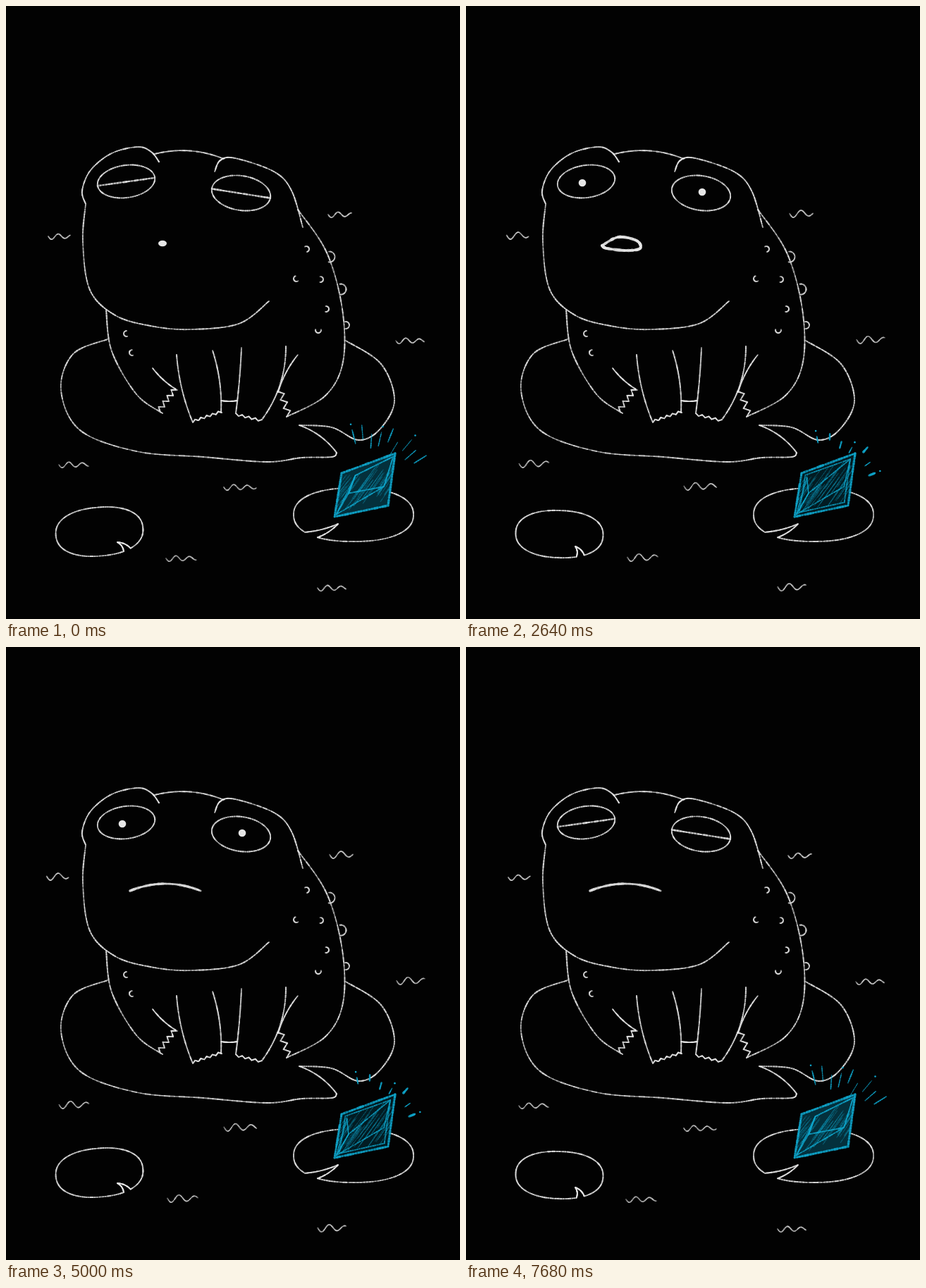
Animation, 644 px wide and 870 px high, one loop 7.84 s. Source, as an HTML page with a canvas:

```html
<!DOCTYPE html>
<html lang="en">
<head>
<meta charset="utf-8">
<title>Frog and gem</title>
<style>
html, body { margin: 0; width: 100%; height: 100%; overflow: hidden; background: #020202; }
canvas { display: block; width: 644px; height: 870px; }
</style>
</head>
<body>
<canvas id="stage" width="644" height="870"></canvas>
<script>
const W = 644, H = 870, LOOP = 7840, TICK = 40, RAD = Math.PI / 180;
const WHITE = '#e6e6e6', BLUE = '#0fa6cc';
const stage = document.getElementById('stage').getContext('2d');
let ctx, seed = 7;

function rnd() {
  seed = (seed * 16807) % 2147483647;
  return seed / 2147483647;
}

const mix = (a, b, u) => a + (b - a) * u;
const polar = (x, y, r, deg) => [x + r * Math.cos(deg * RAD), y + r * Math.sin(deg * RAD)];

// Each pose is drawn once and kept.
function layer(draw) {
  const c = document.createElement('canvas');
  c.width = W;
  c.height = H;
  ctx = c.getContext('2d');
  ctx.lineCap = 'round';
  draw();
  return c;
}

// Grainy chalk stroke along point(u), u from 0 to 1.
function chalk(point, { width = 1.9, color = WHITE, alpha = 0.9, steps = 40 } = {}) {
  ctx.strokeStyle = color;
  let last = point(0);
  for (let i = 1; i <= steps; i++) {
    const next = point(i / steps);
    ctx.globalAlpha = alpha * mix(0.6, 1, rnd());
    ctx.lineWidth = width * mix(0.8, 1.2, rnd());
    ctx.beginPath();
    ctx.moveTo(...last);
    ctx.lineTo(...next);
    ctx.stroke();
    last = next;
  }
  ctx.globalAlpha = 1;
}

// Smooth curve through a few key points.
function curve(points, style) {
  const n = points.length - 1;
  const key = i => points[Math.max(0, Math.min(n, i))];
  chalk(u => {
    const i = Math.min(n - 1, Math.floor(u * n)), s = u * n - i;
    return [0, 1].map(d => {
      const [a, b, c, e] = [-1, 0, 1, 2].map(k => key(i + k)[d]);
      return b + s / 2 * (c - a + s * (2 * a - 5 * b + 4 * c - e + s * (3 * (b - c) + e - a)));
    });
  }, { steps: n * 14, ...style });
}

function line(a, b, style) {
  chalk(u => [mix(a[0], b[0], u), mix(a[1], b[1], u)], { steps: 20, ...style });
}

// Line that bulges sideways by bend.
function bow(a, b, bend, style) {
  const dx = b[0] - a[0], dy = b[1] - a[1], len = Math.hypot(dx, dy);
  chalk(u => {
    const k = 4 * u * (1 - u) * bend / len;
    return [a[0] + dx * u - dy * k, a[1] + dy * u + dx * k];
  }, style);
}

function toes(a, b, count, depth) {
  const dx = b[0] - a[0], dy = b[1] - a[1], len = Math.hypot(dx, dy);
  let last = a;
  for (let i = 1; i <= count * 2; i++) {
    const u = i / (count * 2), k = i % 2 ? depth / len : 0;
    const next = [a[0] + dx * u + dy * k, a[1] + dy * u - dx * k];
    line(last, next, { steps: 5 });
    last = next;
  }
}

function wart(x, y, r, facing) {
  chalk(u => polar(x, y, r, facing + mix(-100, 100, u)), { steps: 12, alpha: 0.8 });
}

function dot(x, y, rx, ry = rx, color = WHITE) {
  ctx.fillStyle = color;
  ctx.beginPath();
  ctx.ellipse(x, y, rx, ry, 0, 0, 7);
  ctx.fill();
}

// Slightly boxy oval, open at one angle where two lines run in to the tip.
function leaf(x, y, rx, ry, tilt, notch, gap, tip) {
  const box = v => Math.sign(v) * Math.abs(v) ** 0.88;
  const rim = u => {
    const a = (notch + mix(gap, 360 - gap, u)) * RAD, c = Math.cos(tilt * RAD), s = Math.sin(tilt * RAD);
    const px = rx * box(Math.cos(a)), py = ry * box(Math.sin(a));
    return [x + px * c - py * s, y + px * s + py * c];
  };
  chalk(rim, { steps: 130 });
  bow(rim(0), tip, 2);
  bow(rim(1), tip, 2);
}

function head() {
  curve([[113, 281], [108, 262], [120, 233], [150, 209], [187, 200], [206, 207], [217, 221]]);
  bow([211, 210], [309, 217], -8);
  curve([[296, 235], [304, 219], [325, 216], [380, 235], [405, 262], [421, 314]]);
  curve([[113, 281], [109, 335], [119, 403], [155, 439], [205, 454], [260, 459], [330, 451], [373, 419]]);
}

function body() {
  curve([[414, 289], [455, 350], [477, 430], [478, 505], [453, 553], [398, 583]]);
  curve([[142, 431], [150, 490], [185, 551], [222, 578]]);
  bow([208, 514], [241, 544], 2);
  bow([242, 495], [265, 591], 4);
  bow([293, 489], [305, 577], -4);
  bow([305, 560], [328, 560], 1);
  bow([334, 485], [326, 578], -1);
  bow([397, 483], [363, 587], -9);
  bow([414, 495], [386, 548], 3);
  toes([243, 545], [219, 577], 4, -7);
  toes([265, 591], [306, 577], 5, 3);
  toes([326, 578], [363, 587], 4, -3);
  toes([385, 547], [398, 583], 3, 8);
  for (const y of [356, 402, 453]) wart(y < 400 ? 459 : mix(475, 482, (y - 402) / 51), y, y > 450 ? 5 : 7.5, 0);
  for (const [x, y, facing] of [[426, 345, -20], [412, 387, 150], [446, 388, 0], [454, 430, 0],
    [443, 460, 90], [171, 465, 170], [179, 492, 170]]) wart(x, y, 4, facing);
}

function bigLeaf() {
  curve([[144, 473], [95, 494], [78, 545], [105, 602], [185, 632], [280, 640], [370, 647], [420, 641], [462, 640], [469, 634]]);
  bow([469, 634], [416, 595], 5);
  curve([[416, 595], [462, 598], [500, 616], [530, 601], [551, 560], [532, 508], [482, 475]]);
}

const frog = layer(() => { head(); body(); bigLeaf(); });

const leaves = [0, 1].map(p => layer(() => {
  leaf(132.5, 746 + 3.5 * p, 62, 34.5 - p, p ? 2 : -5, p ? 63 : 56, 6, [158 - 3 * p, 761 + 6 * p]);
  leaf(493, 722, 85, 38, 0, 133, 9, [471, 735]);
}));

// Gem: u runs along the top edge, v down the left edge.
const facet = (u, v) => [476 + 76 * u - 10 * v, 663 - 28 * u + 62 * v + 12 * u * v];

function loop(points, style) {
  points.forEach((p, i) => line(p, points[(i + 1) % points.length], { color: BLUE, ...style }));
}

function square(inset) {
  const o = 1 - inset;
  return [facet(inset, inset), facet(o, inset), facet(o, o), facet(inset, o)];
}

function rays(count, from, to, length, width) {
  for (let i = 0; i < count; i++) {
    const a = mix(from, to, i / (count - 1)), r = mix(62, 78, rnd()), w = width * mix(0.6, 1.4, rnd());
    line(polar(513, 690, r, a), polar(513, 690, r + length, a), { color: BLUE, width: w, steps: 6 });
    if (i % 3 === 0) dot(...polar(513, 690, r + length + 8, a), 1.3, 1.3, BLUE);
  }
}

const gems = [0, 1].map(p => layer(() => {
  const rim = square(0);
  ctx.fillStyle = p ? '#021c23' : '#04303c';
  ctx.beginPath();
  rim.forEach(c => ctx.lineTo(...c));
  ctx.fill();
  ctx.save();
  ctx.clip();
  for (let i = 0; i < 44; i++) {
    const u = mix(0.08, 1.3, rnd()), v = mix(0.08, 0.5, rnd());
    line(facet(u, v), facet(u - 0.3, v + 0.45), { color: BLUE, width: 1.1, alpha: 0.36, steps: 12 });
  }
  ctx.restore();
  loop(rim, { width: 3 });
  const low = facet(0.03, 0.95), left = facet(0.2, 0.53), right = facet(0.87, 0.6);
  if (p) {
    loop(square(0.08), { width: 1.6, alpha: 0.8 });
    loop([low, facet(0.12, 0.15), left], { width: 1.6, alpha: 0.8 });
    loop([left, facet(0.92, 0.08), right, low], { width: 1.6, alpha: 0.8 });
    rays(7, -101, -22, 9, 2.2);
  } else {
    loop([left, facet(0.28, 0.17), facet(0.97, 0.05), right], { width: 2 });
    loop([low, facet(0.28, 0.17), left], { width: 1.7, alpha: 0.85 });
    line(low, right, { color: BLUE, width: 1.7 });
    rays(9, -104, -32, 20, 1.5);
  }
}));

// x, y, length and sideways drift of each ripple.
const ripples = [[60, 327, 31, -9], [457, 296, 33, 8], [553, 475, 40, 4], [75, 651, 42, 1],
  [309, 683, 46, 1], [227, 784, 43, 8], [442, 826, 40, 1]];

const waters = [0, 1, 2].map(p => layer(() => {
  for (const [x, y, length, drift] of ripples) {
    const amp = p ? 6 : 4.5, cycles = length / (p ? 22 : 19), shift = drift * p * p / 4;
    chalk(u => [x + shift + length * u, y - 1.5 * p + amp * (1 - 0.5 * u) * Math.sin(u * cycles * 2 * Math.PI)],
      { width: 1.8, alpha: 0.68, steps: 30 });
  }
}));

const eyeballs = [
  { x: 170.5, y: 249, rx: 41, ry: 23, tilt: -8, pupil: [165, 251] },
  { x: 333.5, y: 265.5, rx: 42, ry: 24.5, tilt: 9, pupil: [335, 264] }
];

// Eye outlines with lid lines at the given heights.
function look(lids, open) {
  return layer(() => eyeballs.forEach(({ x, y, rx, ry, tilt, pupil }) => {
    ctx.save();
    ctx.translate(x, y);
    ctx.rotate(tilt * RAD);
    chalk(u => [rx * Math.cos(u * 2 * Math.PI), ry * Math.sin(u * 2 * Math.PI)], { steps: 80 });
    for (const h of lids) {
      const half = rx * Math.sqrt(1 - (h / ry) ** 2);
      line([-half, h], [half, h], { width: 2.4 });
    }
    ctx.restore();
    if (open) dot(...pupil, 5.3);
  }));
}

const eyes = {
  closed: look([0.5], false),
  half: look([-5, 4], true),
  wide: look([-12], true),
  open: look([], true)
};

const mouths = {
  dot: layer(() => dot(222, 337, 6, 4.2)),
  oval: layer(() => {
    curve([[193, 340], [216, 328], [242, 333], [247, 344], [228, 347], [200, 344], [193, 340]], { width: 3.8 });
  }),
  frown: layer(() => bow([176, 346], [276, 346], -10, { width: 3.2 }))
};

const eyeKeys = [[0, 'closed'], [1600, 'half'], [1760, 'wide'], [1880, 'open'], [3520, 'closed'],
  [3680, 'open'], [5320, 'closed'], [5480, 'open'], [6040, 'wide'], [6200, 'half'], [6360, 'closed']];
const mouthKeys = [[0, 'dot'], [1160, 'oval'], [2680, 'dot'], [3240, 'frown'], [6160, 'dot'], [7600, 'frown']];
const pose = (keys, t) => keys.filter(k => k[0] <= t).pop()[1];

function frame(now) {
  const t = Math.floor(now % LOOP / TICK) * TICK;
  stage.fillStyle = '#020202';
  stage.fillRect(0, 0, W, H);
  [
    frog,
    waters[Math.floor(t / 196) % 3],
    leaves[t % 980 >= 505 ? 1 : 0],
    gems[t % 470 >= 275 ? 1 : 0],
    eyes[pose(eyeKeys, t)],
    mouths[pose(mouthKeys, t)]
  ].forEach(l => stage.drawImage(l, 0, 0));
}

const start = performance.now();
function run() {
  frame(performance.now() - start);
  requestAnimationFrame(run);
}
run();
</script>
</body>
</html>
```
